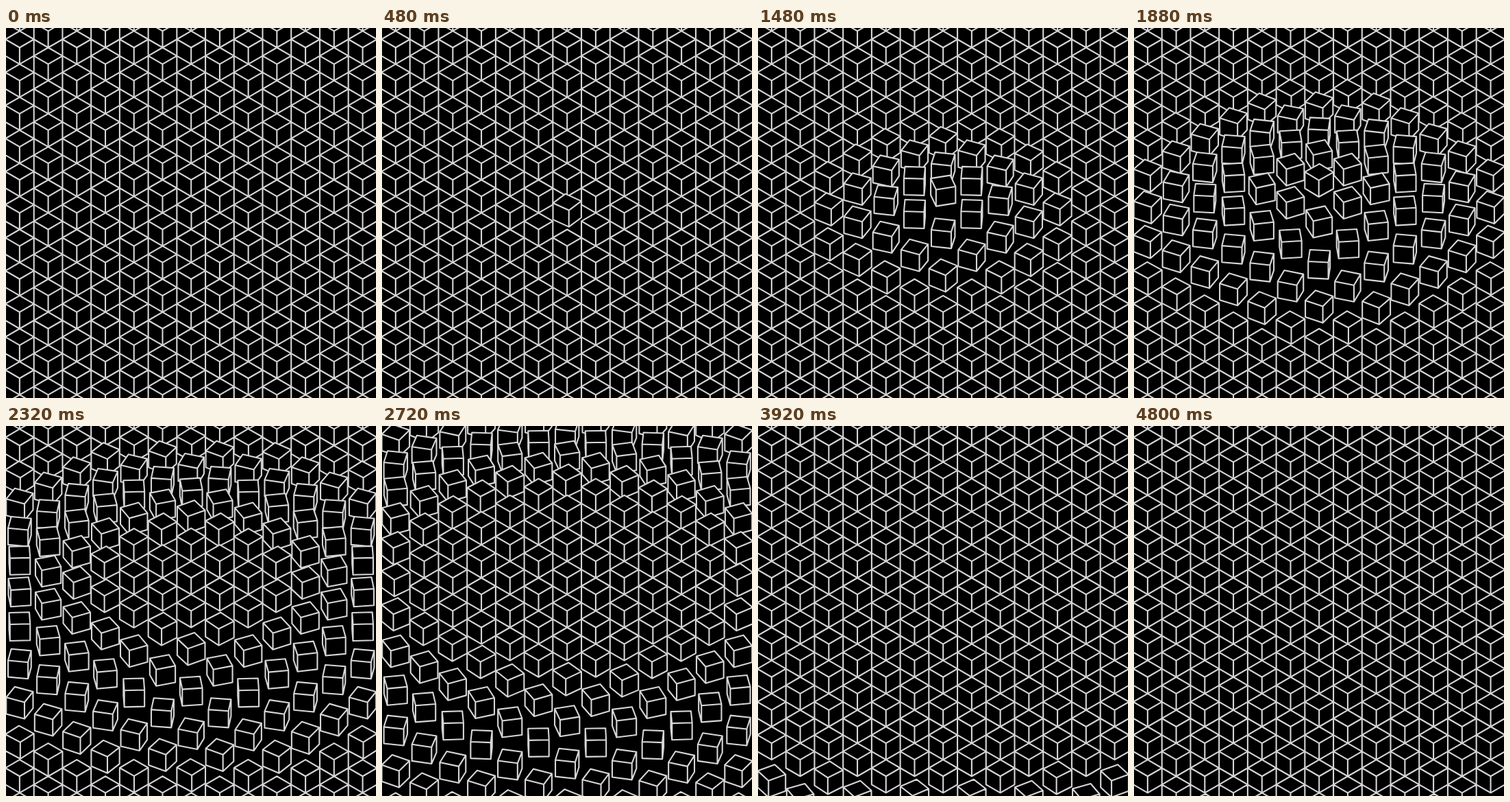
These frames come from a looping animation (540x539 px, 4.84 s). An HTML page with a canvas:

```html
<!DOCTYPE html>
<html lang="en">
<head>
<meta charset="utf-8">
<title>Cube ripple</title>
<style>
  html, body { margin: 0; width: 100%; height: 100%; overflow: hidden; background: #000; }
  canvas { display: block; width: 540px; height: 539px; }
</style>
</head>
<body>
<canvas id="stage" width="540" height="539"></canvas>
<script>
const ctx = document.getElementById('stage').getContext('2d');
const LOOP = 4840, STEP = 40;
const CX = 270.2, CY = 269.4;
const RX = 20.86;                // half width of a cube's top face
const RY = RX / Math.sqrt(3);    // half height of the top face
const EDGE = 2 * RY;             // height of a side
const PITCH = 2 * EDGE;          // vertical distance between cubes
const BAND = 314;                // width of the travelling ripple

const smooth = p => p * p * (3 - 2 * p);
const clamp = v => Math.min(1, Math.max(0, v));

function ease(p, g) {
  return p < 0.5 ? 0.5 * (2 * p) ** g : 1 - 0.5 * (2 - 2 * p) ** g;
}

// Every cube, back to front, with its distance from the middle of the floor.
const cubes = [];
for (let row = -7; row <= 8; row++) {
  for (let col = -7; col <= 7; col++) {
    const dx = col * 2 * RX;
    const dy = (row + (col & 1 ? 0.5 : 0)) * PITCH;
    cubes.push({ x: CX + dx, y: CY + dy, dist: Math.hypot(dx, dy * Math.sqrt(3)) });
  }
}

function trace(points) {
  points.forEach(([x, y], i) => i ? ctx.lineTo(x, y) : ctx.moveTo(x, y));
}

function drawCube(x, y, turn) {
  // A quarter turn looks the same, so keep the front corner facing the viewer.
  const angle = turn > 0.5 ? turn - 1 : turn;
  const corner = k => {
    const a = (angle + k) * Math.PI / 2;
    return [x + RX * Math.sin(a), y - EDGE / 2 + RY * Math.cos(a)];
  };
  const drop = ([px, py]) => [px, py + EDGE];
  const left = corner(-1), front = corner(0), right = corner(1), back = corner(2);

  ctx.beginPath();
  trace([back, right, drop(right), drop(front), drop(left), left]);
  ctx.closePath();
  ctx.fill();
  trace([left, front, right]);
  trace([front, drop(front)]);
  ctx.stroke();
}

function draw(time) {
  const reach = 4 + 906 * smooth(time / LOOP);
  ctx.fillStyle = '#000';
  ctx.fillRect(0, 0, 540, 539);
  ctx.strokeStyle = '#d6d6d6';
  ctx.lineWidth = 2.1;
  ctx.lineJoin = 'round';
  ctx.lineCap = 'round';
  for (const c of cubes) {
    const f = ease(clamp((reach - c.dist) / BAND), 1.1);
    drawCube(c.x, c.y - f * PITCH, f);
  }
}

const start = performance.now();
function tick() {
  const t = (performance.now() - start) % LOOP;
  draw(Math.floor(t / STEP) * STEP);
  requestAnimationFrame(tick);
}
tick();
</script>
</body>
</html>
```
